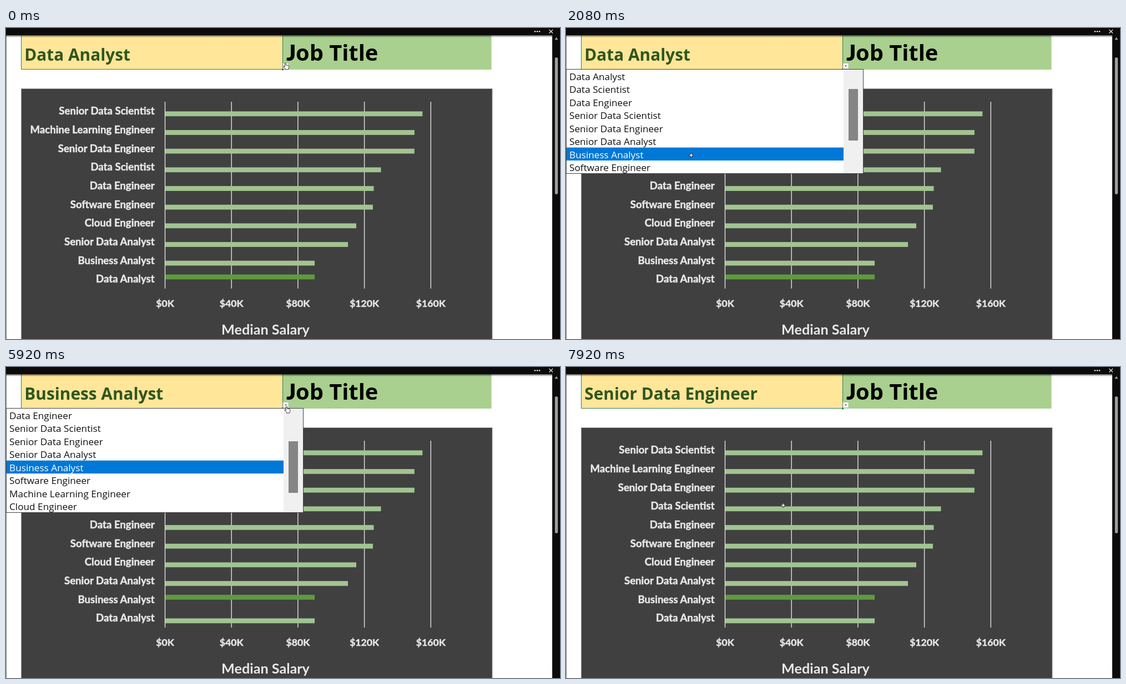
Recreate the animation shown at these times as an HTML page. Size 998x561 px, loop 8000 ms.

```html
<!DOCTYPE html>
<html lang="en">
<head>
<meta charset="utf-8">
<title>Median salary by job title</title>
<style>
  html, body { margin: 0; width: 100%; height: 100%; overflow: hidden; background: #fff; }
  svg { display: block; width: 100%; height: 100%; }
  .ui { font-family: "Open Sans", "Noto Sans", sans-serif; }
  .head { font-weight: 700; font-size: 29.8px; fill: #30561f; }
  .list { font-size: 17.2px; fill: #111; }
  .chart { font-family: Lato, sans-serif; font-weight: 700; fill: #e8e8e8; }
  .label { stroke: #e8e8e8; stroke-width: .5px; }
</style>
</head>
<body>
<svg id="stage" viewBox="0 0 998 561">
  <defs>
    <linearGradient id="shade" x2="0" y2="1">
      <stop stop-color="#000" stop-opacity=".6"/>
      <stop offset="1" stop-color="#000" stop-opacity="0"/>
    </linearGradient>
  </defs>

  <rect width="998" height="561" fill="#fff"/>
  <path d="M.5 13V561" stroke="#777"/>

  <rect x="28" y="13" width="470.5" height="61.5" fill="#ffe699"/>
  <rect x="499" y="13" width="375.5" height="62" fill="#a9d08e"/>
  <path d="M27.5 13V74.5H498.5V13" fill="none" stroke="#2f7d5c"/>
  <rect x="496.5" y="72.5" width="4" height="4" fill="#217346" stroke="#fff" stroke-width=".6"/>
  <text id="value" class="ui head" x="33.3" y="58.5"></text>
  <text class="ui" y="59" font-size="39.8" font-weight="700" fill="#000"><tspan x="505" font-family="Lato, sans-serif" font-weight="900">J</tspan><tspan x="522">ob Title</tspan></text>
  <rect x="499" y="63.5" width="10" height="10" fill="#fbfbfb" stroke="#b5b5b5" stroke-width=".8"/>
  <path d="M501.8 67.5h4.4l-2.2 2.6z" fill="#555"/>

  <g id="chart" class="chart">
    <rect x="27.5" y="109.5" width="848.5" height="470" fill="#404040" stroke="#a0a0a0"/>
    <text x="467.5" y="553" font-size="25.2" text-anchor="middle">Median Salary</text>
  </g>

  <g id="menu">
    <rect x=".5" y="74.5" width="535" height="188" fill="#fff" stroke="#444"/>
    <rect x="500" y="75" width="35" height="187" fill="#f0f0f0"/>
    <rect id="thumb" x="509" width="17" height="93" fill="#858585"/>
    <rect id="mark" x="1" width="499" height="23.43" fill="#0078d7"/>
  </g>

  <rect y="13" width="984" height="4" fill="url(#shade)"/>
  <path d="M0 0H998V561H984V13H0z" fill="#0b0b0b"/>
  <g fill="#e8e8e8">
    <circle cx="953" cy="6.3" r="1.3"/><circle cx="957" cy="6.3" r="1.3"/><circle cx="961" cy="6.3" r="1.3"/>
  </g>
  <path d="M978.5 3l6.5 6.5M985 3l-6.5 6.5" stroke="#e8e8e8" stroke-width="1.2"/>
  <path d="M988.5 21.3h6l-3-4.8z" fill="#9d9d9d"/>
  <rect x="988.8" y="53" width="5.4" height="247" rx="2.7" fill="#9d9d9d"/>

  <g id="cursor">
    <path id="cross" d="M-1.2-3.6h2.4v2.4h2.4v2.4h-2.4v2.4h-2.4v-2.4h-2.4v-2.4h2.4z" fill="#fff" stroke="#222" stroke-width=".9"/>
    <path id="hand" d="M-2.2 1.5V-5q1-1.4 2 0V-1.6l1.6.1 1.5.4 1.5.5q.8.4.8 1.3V2.6q0 1.4-1 2.4V6.4H-1.4V5L-4.6 1.6q-.3-1.3.9-1.2z" fill="#fff" stroke="#222" stroke-width=".9" stroke-linejoin="round"/>
  </g>
</svg>
<script>
const $ = id => document.getElementById(id);

function add(parent, tag, attrs, text = "") {
  const el = document.createElementNS("http://www.w3.org/2000/svg", tag);
  for (const name in attrs) el.setAttribute(name, attrs[name]);
  el.textContent = text;
  return parent.appendChild(el);
}

const chart = $("chart"), menu = $("menu");
const BAR_PITCH = 33.67, BAR_HEIGHT = 8.8, ROW = 23.43, MENU_TOP = 75;

for (let i = 0; i < 5; i++) {
  const x = 286.5 + i * 119.7;
  add(chart, "path", { d: `M${x} 133V470`, stroke: "#e2e2e2", "stroke-width": 1.4 });
  add(chart, "text", { class: "label", x, y: 502.5, "font-size": 17.6, "text-anchor": "middle" }, `$${i * 40}K`);
}

// Job title and the right end of its bar
const bars = [
  ["Senior Data Scientist", 750.3], ["Machine Learning Engineer", 735.8],
  ["Senior Data Engineer", 735.8], ["Data Scientist", 675.5],
  ["Data Engineer", 662.5], ["Software Engineer", 661],
  ["Cloud Engineer", 631], ["Senior Data Analyst", 616],
  ["Business Analyst", 556], ["Data Analyst", 556]
].map(([title, end], i) => {
  const y = 150.4 + i * BAR_PITCH;
  add(chart, "text", { class: "label", x: 267.7, y: y + 6, "font-size": 18.6, "text-anchor": "end" }, title);
  const rect = add(chart, "rect", { x: 287, width: end - 287, height: BAR_HEIGHT });
  return { title, y, rect };
});

const options = ["Data Analyst", "Data Scientist", "Data Engineer", "Senior Data Scientist",
  "Senior Data Engineer", "Senior Data Analyst", "Business Analyst", "Software Engineer",
  "Machine Learning Engineer", "Cloud Engineer"];
const rows = Array.from({ length: 8 }, (_, i) =>
  add(menu, "text", { class: "ui list", x: 6, y: 94 + i * ROW }));

// All times below are ticks of 1/12 s
const TICK = 1000 / 12, LOOP = 96;

const path = [
  [0, 504.5, 68.5], [1, 506.5, 70], [8, 506.5, 70], [15, 314, 119], [18, 268, 138], [25, 225.5, 229.5],
  [32, 225.5, 229.5], [33, 428, 75], [43, 428, 75], [44, 513, 71], [46, 513, 71], [49, 506.7, 76.5],
  [72, 506.7, 76.5], [76, 352, 118], [80, 322, 134], [87, 322, 134], [88, 342, 170],
  [94, 342, 170], [95, 391.3, 249.5], [96, 391.3, 249.5]
];

// From tick: cell value, highlighted bar, first menu option (-1 when closed)
const states = [
  [0, "Data Analyst", "Data Analyst", -1],
  [3, "Data Analyst", "Data Analyst", 0],
  [31, "Business Analyst", "Data Analyst", -1],
  [52, "Business Analyst", "Business Analyst", -1],
  [70, "Business Analyst", "Business Analyst", 2],
  [85, "Senior Data Engineer", "Business Analyst", -1]
];

function cursorAt(tick) {
  const n = path.findIndex(p => p[0] > tick);
  const [t0, x0, y0] = path[n - 1], [t1, x1, y1] = path[n];
  const k = (tick - t0) / (t1 - t0);
  return [x0 + (x1 - x0) * k, y0 + (y1 - y0) * k];
}

function draw(tick) {
  const [x, y] = cursorAt(tick);
  const [, value, lit, first] = states.filter(s => s[0] <= tick).pop();

  $("value").textContent = value;
  for (const bar of bars) {
    const on = bar.title === lit;
    bar.rect.setAttribute("y", bar.y - (on ? BAR_HEIGHT : 0));
    bar.rect.setAttribute("fill", on ? "#5f9a3f" : "#a1c491");
  }

  const open = first >= 0;
  menu.style.display = open ? "" : "none";
  if (open) {
    const inside = y > MENU_TOP && x < 500;
    const active = inside ? Math.floor((y - MENU_TOP) / ROW) : options.indexOf(value) - first;
    $("mark").setAttribute("y", MENU_TOP + active * ROW);
    $("thumb").setAttribute("y", 110 + first * 12);
    rows.forEach((row, i) => {
      row.textContent = options[first + i];
      row.style.fill = i === active ? "#fff" : "";
    });
  }

  const pointing = tick <= 8 || (tick >= 47 && tick <= 72);
  $("hand").style.display = pointing ? "" : "none";
  $("cross").style.display = pointing ? "none" : "";
  $("cursor").setAttribute("transform", `translate(${x} ${y})`);
}

const start = performance.now();
let shown = -1;
function loop() {
  const elapsed = performance.now() - start;
  const tick = Math.floor((elapsed + 5) / TICK) % LOOP;
  if (tick !== shown) draw(shown = tick);
  requestAnimationFrame(loop);
}
loop();
</script>
</body>
</html>
```
